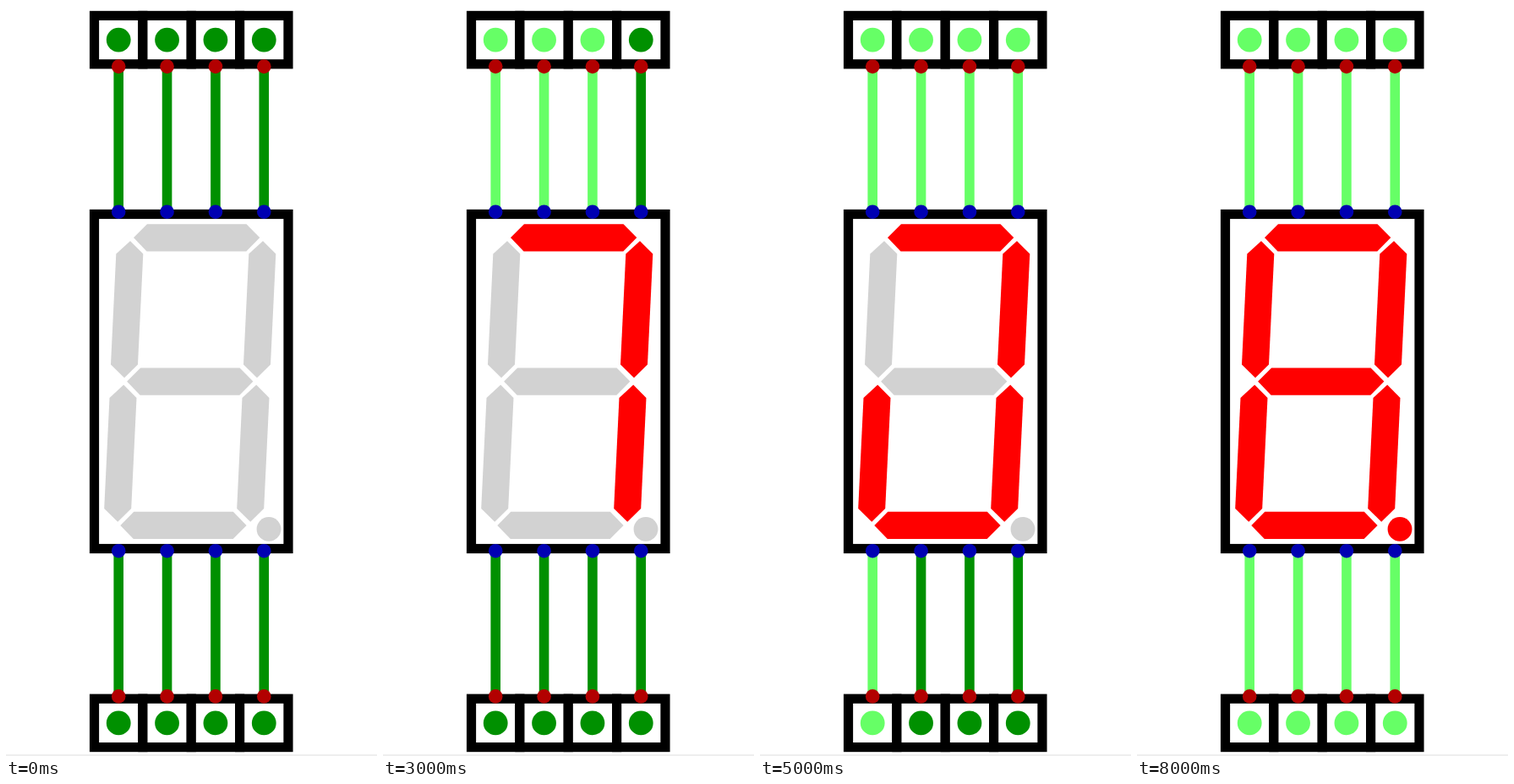
Write an HTML page that moves like this. It is 439 by 888 pixels and loops after 9 s.

```html
<!DOCTYPE html>
<html lang="en">
<head>
<meta charset="utf-8">
<title>Seven-segment display</title>
<style>
  html, body { margin: 0; width: 100%; height: 100%; overflow: hidden; background: #fff; }
  svg { display: block; width: 439px; height: 888px; }
  .frame { fill: #fff; stroke: #000; stroke-width: 11.2; }
  .wire { stroke: #009000; stroke-width: 11.6; }
  .lamp { fill: #009000; }
  .segment { fill: #d2d2d2; }
  .on .wire { stroke: #66ff66; }
  .on .lamp { fill: #66ff66; }
  .on .segment { fill: #f00; }
  .output { fill: #b20000; }
  .input { fill: #0000b2; }
</style>
</head>
<body>
<svg viewBox="0 0 439 888">
  <rect y="886" width="439" height="2" fill="#eee"/>
  <rect class="frame" x="104.5" y="246.5" width="229.5" height="396"/>
</svg>
<script>
const STEP = 1000, STEPS = 9;
const PITCH = 57.36, LEFT = 133.2;
const svg = document.querySelector('svg');

function add(parent, tag, attrs = {}) {
  const el = document.createElementNS('http://www.w3.org/2000/svg', tag);
  for (const name in attrs) el.setAttribute(name, attrs[name]);
  return parent.appendChild(el);
}

const dot = (parent, cls, cx, cy, r) => add(parent, 'circle', { class: cls, cx, cy, r });

const BAR = '151,274.3 167,258.2 284.5,258.2 300.3,274.3 284.3,290.5 166.5,290.5';
const POST = '147,278.2 162.3,293.5 156,424.5 140,440.3 124,424.5 130.3,293.5';

// Segments a to g: outline and offset
const segments = [
  [BAR, 0, 0], [POST, 157, 0], [POST, 149.2, 170.4], [BAR, -15.7, 340.6],
  [POST, -7.8, 170.4], [POST, 0, 0], [BAR, -7.9, 170.3]
];

const groups = Array.from({ length: 8 }, () => add(svg, 'g'));

groups.forEach((group, i) => {
  if (i < 7) {
    const [points, dx, dy] = segments[i];
    add(group, 'polygon', { class: 'segment', points, transform: `translate(${dx} ${dy})` });
  } else {
    dot(group, 'segment', 311, 619.4, 14.4);
  }

  const top = i < 4;
  const x = LEFT + (i % 4) * PITCH;
  const lampY = top ? 40.1 : 848.9;
  const outY = top ? 71.6 : 817.4;
  const inY = top ? 243.7 : 645.2;
  add(group, 'rect', {
    class: 'frame', x: x - PITCH / 2, y: lampY - PITCH / 2, width: PITCH, height: PITCH
  });
  dot(group, 'lamp', x, lampY, 14.4);
  add(group, 'line', { class: 'wire', x1: x, y1: outY, x2: x, y2: inY });
  dot(group, 'output', x, outY, 8.3);
  dot(group, 'input', x, inY, 8.3);
});

const start = performance.now();

function draw() {
  const lit = Math.floor((performance.now() - start) / STEP) % STEPS;
  groups.forEach((group, i) => group.classList.toggle('on', i < lit));
  requestAnimationFrame(draw);
}
draw();
</script>
</body>
</html>
```
